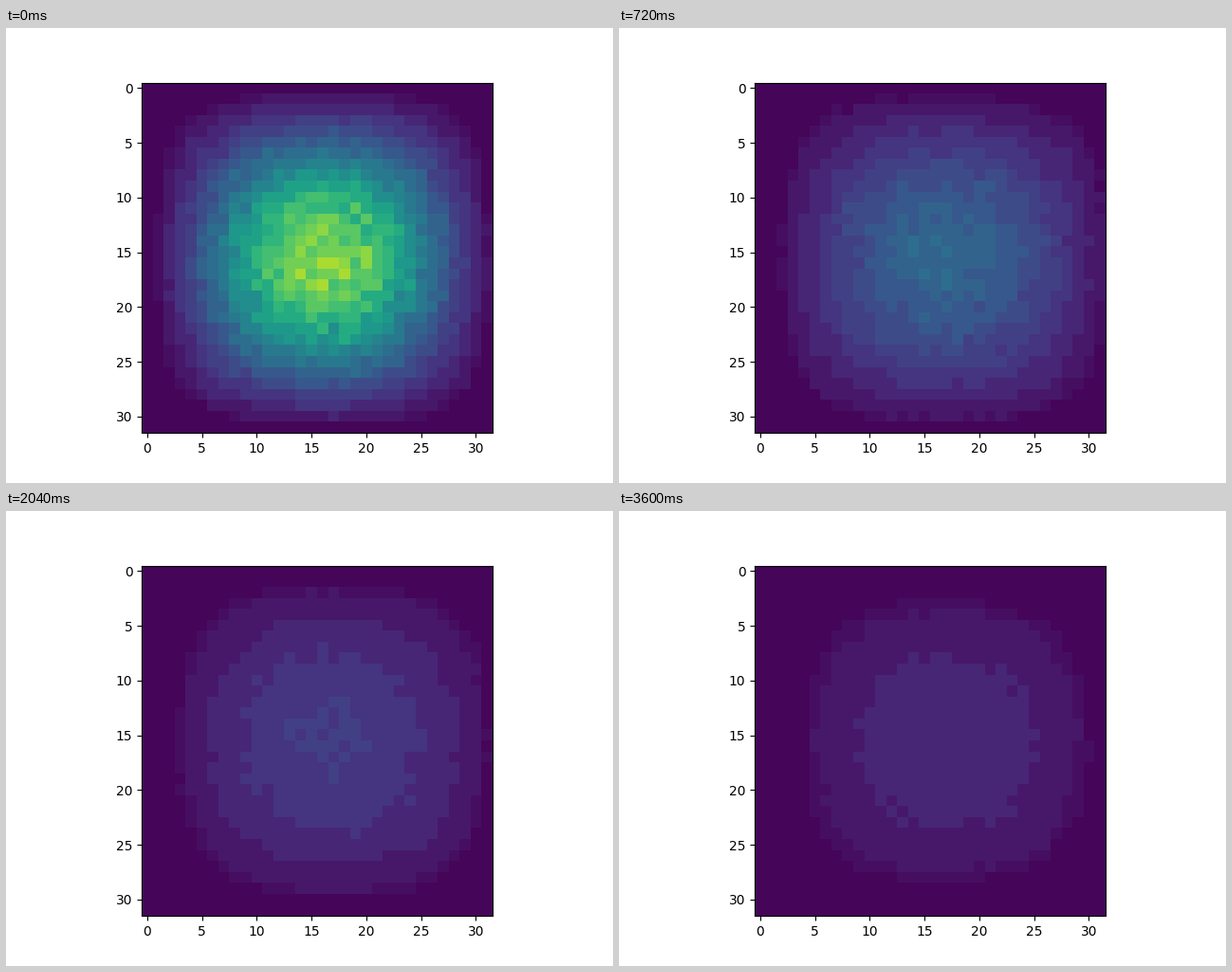
These frames come from a looping animation (640x480 px, 3840 ms). A matplotlib script:

```python
import numpy as np
import matplotlib.pyplot as plt
from matplotlib.animation import FuncAnimation

SIZE = 32
FRAMES = 32
STEP_MS = 120
SETTLED = 24   # from here the noise stands still
PERIOD = 34    # width of the cosine hump in cells
BAND = 0.0425  # height of one tone band

# Even tone bands, with a thin extra one around the dark border
EDGES = BAND * np.r_[1, 1.2, 2:24]
TONES = BAND * np.r_[0.3, 0.85, 1.5:24]

rows, cols = np.mgrid[:SIZE, :SIZE]


def grain(key):
    return np.random.default_rng(100 + key).normal(size=(SIZE, SIZE))


def noise(n):
    """Noise that drifts slowly from one grain to the next."""
    key, part = divmod(min(n, SETTLED) / 4, 1)
    mix = part * np.pi / 2
    return np.cos(mix) * grain(int(key)) + np.sin(mix) * grain(int(key) + 1)


def hump(pos, center):
    return np.cos(np.pi * (pos - center) / PERIOD).clip(0)


def field(n):
    if n >= SETTLED:
        n -= n % 3  # the last stretch moves every third step
    peak = 1 / (1.22 + 0.35 * n ** 0.9)
    cx = 17 - 0.9 * np.exp(-n / 4)
    power = 1 + 0.65 * np.exp(-n / 7)
    sigma = 0.06 - 0.001 * min(n, SETTLED)
    shape = (hump(cols, cx) * hump(rows, 15.6)) ** power
    return TONES[np.digitize(peak * shape * (1 + sigma * noise(n)), EDGES)]


fig, ax = plt.subplots(figsize=(6.4, 4.8), dpi=100)
image = ax.imshow(field(0), cmap="viridis", vmin=0, vmax=1)


def update(n):
    image.set_data(field(n))
    return [image]


anim = FuncAnimation(fig, update, frames=FRAMES, interval=STEP_MS,
                     repeat=True, repeat_delay=0)
plt.show()
```
